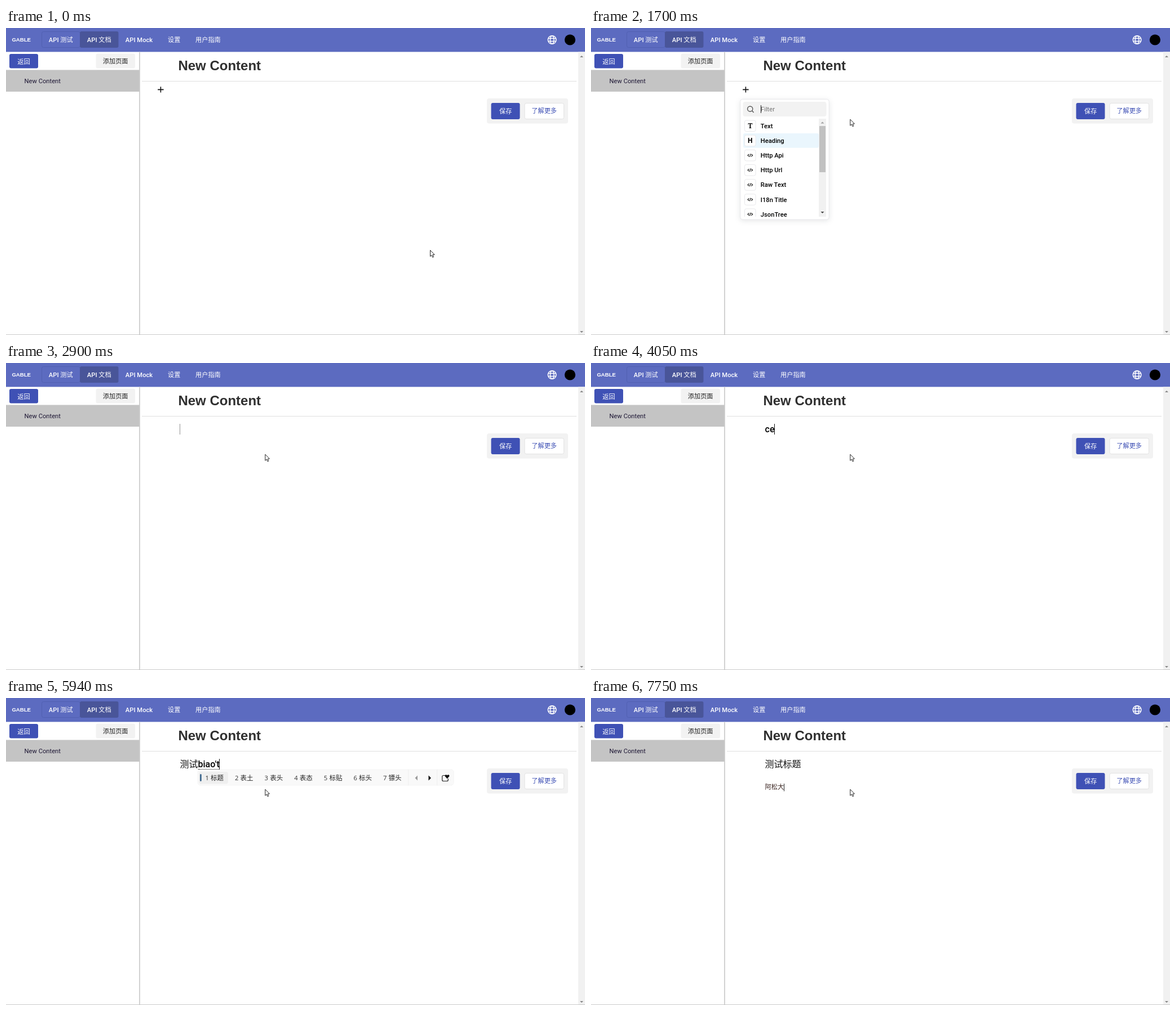
Write an HTML page that moves like this. It is 1027 px wide and 545 px high and loops after 8 s.

```html
<!DOCTYPE html>
<html lang="zh-CN">
<head>
<meta charset="utf-8">
<title>API 文档</title>
<style>
  html, body { margin: 0; width: 100%; height: 100%; overflow: hidden; background: #fff; }
  svg { display: block; }
  text { font-family: Roboto, "Noto Sans CJK SC", "Noto Sans CJK", sans-serif; white-space: pre; }
  .arial { font-family: "Liberation Sans", Arial, sans-serif; font-weight: 700; }
  .ime { font-family: "Open Sans", "Noto Sans CJK SC", "Noto Sans CJK", sans-serif; }
  .slab { font-family: "Noto Serif", serif; }
</style>
</head>
<body>
<svg id="stage" width="1027" height="545" viewBox="0 0 1027 545">
  <g id="page"></g>
  <g id="live"></g>
</svg>
<script>
const LOOP = 8000;
const page = document.getElementById('page');
const live = document.getElementById('live');
const BLUE = '#3f51b5';

const rect = (x, y, w, h, fill, more = '') =>
  `<rect x="${x}" y="${y}" width="${w}" height="${h}" fill="${fill}" ${more}/>`;
const path = (d, more) => `<path d="${d}" ${more}/>`;
const label = (x, y, str, fill = '#000', size = 11.2, more = '') =>
  `<text x="${x}" y="${y}" font-size="${size}" fill="${fill}" ${more}>${str}</text>`;
const medium = 'font-weight="500"';

// Small filled triangle: dx/dy give the pointing direction
const arrow = (x, y, dx, dy, fill, r = 3) => {
  const bx = x - dx * r / 2, by = y - dy * r / 2;
  return path(`M${bx + dy * r} ${by + dx * r}L${bx - dy * r} ${by - dx * r}L${x + dx * r / 2} ${y + dy * r / 2}Z`,
    `fill="${fill}"`);
};
const plus = (x, y) =>
  path(`M${x - 5.2} ${y}h10.4M${x} ${y - 5.2}v10.4`, 'stroke="#111" stroke-width="1.6" fill="none"');

function drawPage() {
  const globe = 'stroke="#fff" stroke-width="1.5" fill="none"';
  return [
    rect(0, 0, 1027, 545, '#fff'),
    rect(0, 0, 1027, 42.4, '#5c6bc0'),
    rect(63.5, 6.5, 68, 28, 'none', 'rx="3" stroke="#5160b2"'),
    rect(131, 6, 68.5, 29, '#495599', 'rx="3"'),
    label(10.4, 24, 'GABLE', '#fff', 9.6, 'class="arial"'),
    label(75.8, 24.5, 'API 测试', '#fff', 11.2, medium),
    label(143.8, 24.5, 'API 文档', '#fff', 11.2, medium),
    label(211.8, 24.5, 'API Mock', '#fff', 11.2, medium),
    label(287, 24.7, '设置', '#fff'),
    label(336, 24.7, '用户指南', '#fff'),
    `<circle cx="968.6" cy="21" r="7.3" ${globe}/>`,
    `<ellipse cx="968.6" cy="21" rx="3.3" ry="7.3" ${globe}/>`,
    path('M962 18.4h13.2M962 23.6h13.2', globe),
    '<circle cx="1000.4" cy="21" r="9.6" fill="#000"/>',

    rect(236, 42.4, 2, 502, '#d2d2d2'),
    rect(6, 46, 51, 25.4, BLUE, 'rx="3"'),
    label(20.3, 63.7, '返回', '#fff'),
    rect(159.5, 45.6, 69.5, 26, '#f2f2f2', 'rx="3"'),
    label(171.8, 63, '添加页面', '#222'),
    rect(0, 74, 236, 1, '#ddd'),
    rect(0, 75, 236.5, 38, '#c4c4c4'),
    label(32.6, 97.8, 'New Content', '#1c1533'),

    label(305.4, 75, 'New Content', '#303030', 24, 'class="arial"'),
    rect(241, 94, 771, 1, '#dedede'),
    rect(853, 125, 144, 44.5, '#f2f2f2', 'rx="4"'),
    rect(860.5, 133, 51, 29, BLUE, 'rx="3"'),
    label(875, 151.8, '保存', '#fff'),
    rect(920, 133.5, 69.5, 28, '#fff', 'rx="3" stroke="#e2e2e2"'),
    label(932.3, 151.4, '了解更多', BLUE),

    rect(1015, 42.4, 12, 502, '#f1f1f1'),
    arrow(1021, 50.5, 0, -1, '#858585'),
    arrow(1021, 539.5, 0, 1, '#858585'),
    rect(0, 544, 1027, 1, '#c9c9c9'),
  ].join('');
}

const BLOCKS = ['Text', 'Heading', 'Http Api', 'Http Url', 'Raw Text', 'I18n Title', 'JsonTree'];

function drawMenu({ menu, sel, filterCaret }) {
  const row = (name, i) => {
    const y = 173.8 + 26.15 * i;
    const mark = i < 2
      ? label(282.3, y + 4.2, name[0], '#000', 12,
          `font-weight="700" text-anchor="middle" ${i ? '' : 'class="slab"'}`)
      : path(`M280.3 ${y - 2.2}l-2.2 2.2l2.2 2.2M284.3 ${y - 2.2}l2.2 2.2l-2.2 2.2M283 ${y - 2.8}l-1.4 5.6`,
          'stroke="#111" stroke-width="1.2" fill="none"');
    return (i === sel ? rect(270, y - 13, 134, 25.8, '#eaf6fd', 'rx="3"') : '') +
      rect(272.5, y - 9.8, 19.6, 19.6, '#fff', 'rx="3" stroke="#e8e8eb"') + mark +
      label(300.8, y + 4, name, '#000', 11.2, medium);
  };
  return `<g opacity="${menu}">
    <g style="filter:drop-shadow(0 2px 5px rgba(13,20,33,.1))">
    ${rect(264.8, 126.5, 157.4, 213.5, '#fff', 'rx="4" stroke="#e8e8eb"')}</g>
    ${rect(269.5, 131, 148, 26, '#f2f2f2', 'rx="4"')}
    <circle cx="282.2" cy="143.6" r="4.6" fill="none" stroke="#555" stroke-width="1.4"/>
    ${path('M285.6 147l3 3', 'stroke="#555" stroke-width="1.5"')}
    ${label(301, 148, 'Filter', '#757575')}
    ${filterCaret ? rect(301, 137, 1, 14, '#222') : ''}
    <clipPath id="list"><rect x="265" y="160" width="152" height="175"/></clipPath>
    <g clip-path="url(#list)">${BLOCKS.map(row).join('')}</g>
    ${rect(404, 161, 13, 174, '#f1f1f1')}${rect(405, 174, 11, 82, '#c1c1c1')}
    ${arrow(410.5, 168, 0, -1, '#a0a0a0')}${arrow(410.5, 327.5, 0, 1, '#444')}
  </g>`;
}

// Input-method popup; its width follows the candidate lengths
function drawIme(x, y, words) {
  const mid = y + 15, CH = 11.5;
  const pitch = w => 29.6 + CH * w.length;
  let at = x + 14, items = '';
  words.forEach((w, i) => {
    items += label(at - 0.6, mid + 4.2, i + 1, '#333', 11.2, 'class="ime"') +
      label(at + 9, mid + 4.2, w, '#222', CH, 'class="ime"');
    at += pitch(w);
  });
  const sep = at - 9;
  const hx = sep + 66.5;
  return rect(x, y, sep + 81 - x, 28, '#f9f9f9', 'rx="5" stroke="#f3f3f3" stroke-width=".8"') +
    rect(x + 2, y + 4, pitch(words[0]) - 0.6, 21.5, '#efefef', 'rx="4"') +
    rect(x + 4, y + 8, 2.8, 13, '#40698f', 'rx="1.4"') + items +
    rect(sep, y, 1, 28, '#eee') + rect(sep + 51, y, 1, 28, '#eee') +
    arrow(sep + 14.5, mid, -1, 0, '#999', 4.4) + arrow(sep + 38.5, mid, 1, 0, '#000', 4.4) +
    path(`M${hx - 0.5} ${mid - 4.5}h-3.5q-2 0-2 2v6q0 2 2 2h6.5q2 0 2-2v-2.5`,
      'fill="none" stroke="#222" stroke-width="1.2"') +
    path(`M${hx + 2.8} ${mid + 1.2}l-3.4-3.6c-1.8-2.6 1.6-4.8 3.4-2.4c1.8-2.4 5.2-.2 3.4 2.4z`, 'fill="#111"');
}

const drawMouse = ([x, y]) =>
  path(`M${x} ${y}v11l2.4-2.2l1.9 3.9l1.8-.9l-1.8-3.7l3.3-.3z`,
    'fill="#fff" stroke="#222" stroke-width="1" stroke-linejoin="round"');

const LINES = [
  { size: 11.2, base: 113, top: 102, tall: 14, weight: 400 },
  { size: 16, base: 123.4, top: 108, tall: 19, weight: 500 },
  { size: 11.2, base: 162, top: 152, tall: 13.5, weight: 400 },
];
const pen = document.createElement('canvas').getContext('2d');
function widthOf(str, size, weight) {
  pen.font = `${weight} ${size}px Roboto, "Noto Sans CJK SC", "Noto Sans CJK", sans-serif`;
  return pen.measureText(str).width;
}

function drawEditor(s) {
  const ln = LINES[s.line], x = 308.5;
  const done = s.line === 2 ? s.body : s.head;
  const start = x + widthOf(done, ln.size, 400);
  const end = start + widthOf(s.raw, ln.size, ln.weight);
  let out = label(x, LINES[1].base, s.head, '#111', 16) + label(x, LINES[2].base, s.body, '#3a2420');
  out += label(start, ln.base, s.raw, '#000', ln.size, `font-weight="${ln.weight}"`);
  if (s.words) {
    const low = ln.top + ln.tall;
    out += rect(start, low - 1, end - start, 1, '#444');
    out += drawIme(start - 0.5, s.line === 2 ? 165 : 127, s.words.split(' '));
  }
  if (s.caret) out += rect(Math.round(end - 0.4), ln.top, 1, ln.tall, '#111', `opacity="${s.caret}"`);
  return out;
}

function drawHandle(mode) {
  if (mode === 1) return plus(274.4, 109.4);
  if (mode !== 2) return '';
  let dots = plus(256.6, 159.5);
  for (let i = 0; i < 6; i++)
    dots += rect(274.7 + (i % 2) * 4.2, 154.5 + (i >> 1) * 4.1, 2.1, 2.1, '#111', 'rx=".7"');
  return dots;
}

// Each step lists only what changes at that time
const STEPS = [
  [0, { mouse: [752.5, 394.5], handle: 1, line: 0, head: '', body: '', raw: '', words: '',
        caret: 0, menu: 0, sel: -1, filterCaret: 0 }],
  [70, { mouse: [532.5, 224.5] }],
  [390, { mouse: [516.5, 208.5] }],
  [500, { mouse: [496.5, 190.5] }],
  [620, { mouse: [478.5, 176.5] }],
  [740, { mouse: [466.5, 167.5] }],
  [860, { mouse: [459.8, 162.2] }],
  [970, { caret: 1 }],
  [1500, { menu: 1, caret: 0, filterCaret: 1 }],
  [1600, { sel: 0 }],
  [1700, { sel: 1 }],
  [2180, { sel: 2, filterCaret: 0 }],
  [2630, { sel: 1, filterCaret: 1 }],
  [2740, { menu: 0.4, handle: 0 }],
  [2820, { menu: 0, line: 1, caret: 0.25 }],
  [2900, { caret: 0.45 }],
  [3010, { caret: 0.8 }],
  [3100, { caret: 1 }],
  [3370, { raw: 'c' }],
  [3520, { raw: 'ce' }],
  [3700, { raw: 'ces' }],
  [4000, { raw: 'ce' }],
  [4190, { raw: 'c' }],
  [4390, { raw: '' }],
  [4580, { raw: 'c', words: '从 才 次 吃 错 出 长' }],
  [4720, { raw: 'ce', words: '测 侧 策 册 厕 恻 测试' }],
  [4880, { raw: "ce's", words: '测试 厕所 测算 测速 侧式 侧身 侧室' }],
  [5080, { raw: '', words: '', head: '测试' }],
  [5300, { raw: 'b', words: '不 吧 把 被 比 本 别' }],
  [5400, { raw: 'bi', words: '比 必 笔 避 币 毕 闭' }],
  [5500, { raw: 'bia', words: '表 边 变 标 便 编 遍' }],
  [5600, { raw: 'biao', words: '表 标 彪 飙 镖 裱 膘' }],
  [5940, { raw: "biao't", words: '标题 表土 表头 表态 标贴 标头 镖头' }],
  [6090, { raw: "biao'ti", words: '标题 表体 标体 表替 表提 标梯 表题' }],
  [6300, { raw: '', words: '', head: '测试标题' }],
  [6660, { line: 2, handle: 2, caret: 0.5 }],
  [6800, { caret: 1 }],
  [6980, { handle: 0, raw: 'a', words: '啊 阿 按 安 爱 案 暗' }],
  [7080, { raw: "a's", words: '按时 暗示 安 啊 阿 爱 按' }],
  [7180, { raw: "a's'd", words: '阿松大 按时到 按时打 按时的 暗示的 按时' }],
  [7280, { words: '阿松大 按时到 按时打 按时的 暗示的 暗示到 按时' }],
  [7700, { raw: '', words: '', body: '阿松大', caret: 0 }],
  [7750, { caret: 0.9 }],
];
let last = {};
const SCENES = STEPS.map(([at, change]) => [at, last = { ...last, ...change }]);

page.innerHTML = drawPage();
let shown = -1;
function tick(now) {
  const t = now % LOOP;
  const i = SCENES.findLastIndex(([at]) => at <= t);
  if (i !== shown) {
    const s = SCENES[i][1];
    live.innerHTML = drawHandle(s.handle) + drawEditor(s) + (s.menu ? drawMenu(s) : '') + drawMouse(s.mouse);
    shown = i;
  }
}
function loop() {
  tick(performance.now() - born);
  requestAnimationFrame(loop);
}
const born = performance.now();
loop();
</script>
</body>
</html>
```
